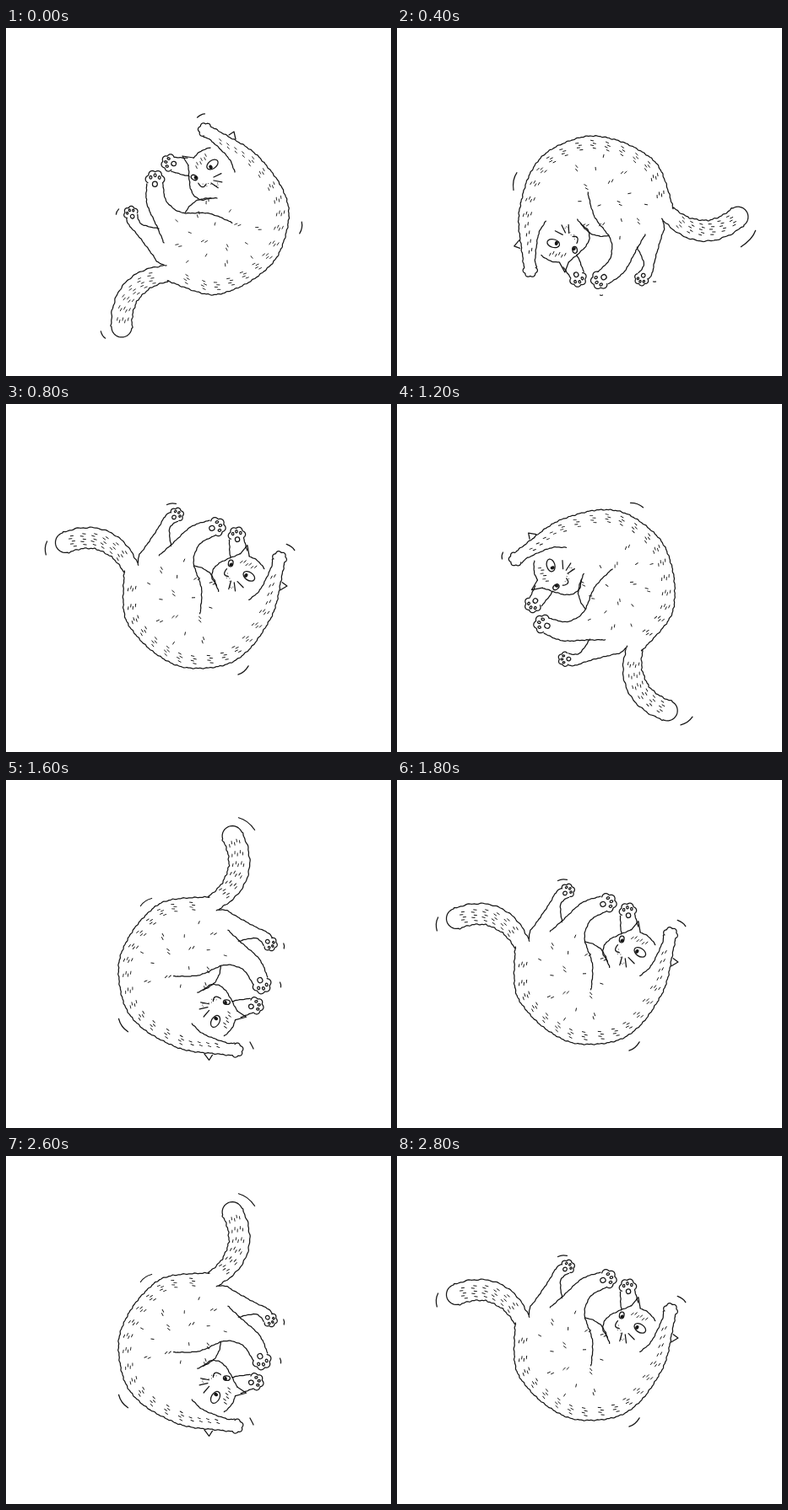
Recreate the animation shown at these times as an HTML page with a canvas. Size 456 by 413 pixels, loop 3000 ms.

```html
<!DOCTYPE html>
<html lang="en">
<head>
<meta charset="utf-8">
<title>Tumbling cat</title>
<style>
html, body { margin: 0; width: 100%; height: 100%; overflow: hidden; background: #fff; }
canvas { display: block; }
</style>
</head>
<body>
<canvas id="stage" width="456" height="413"></canvas>
<script>
const ctx = document.getElementById("stage").getContext("2d");
const POSE_MS = 200;
const INK = "#161616";
const PIVOT = [199.6, 217];

// The same cat turned about its pivot; swoosh: [x, y, angle, length]
const poses = [
  { x: 199.6, y: 217, turn: 0, swooshes:
    [[231, 104, -0.45, 10], [349, 237, 1.75, 14], [132, 218, -1.1, 7], [115, 364, 1, 10]] },
  { x: 216.1, y: 253.8, turn: -67.8, swooshes:
    [[284, 120, 0.35, 16], [125, 180, 1.7, 8], [343, 376, -0.6, 17]] },
  { x: 256.2, y: 258, turn: -127.3, swooshes:
    [[140, 182, 1.76, 21], [416, 250, 2.3, 26], [242, 317, 0, 3], [305, 301, 0, 3]] },
  { x: 266.8, y: 218, turn: -203.9, swooshes:
    [[285, 52, 0.65, 24], [166, 145, -0.6, 16], [139, 291, 0.95, 19],
     [329, 197, 1.5, 6], [325, 243, 1.4, 6], [291, 315, 1.1, 9]] },
  { x: 221.3, y: 179.5, turn: -288.7, swooshes:
    [[196, 119, -0.1, 11], [48, 171, 1.65, 16], [281, 316, -0.7, 16], [337, 170, 0.65, 12]] },
];

const mix = (a, b, t) => a + (b - a) * t;

function stroke(points) {
  ctx.beginPath();
  points.forEach(([x, y]) => ctx.lineTo(x, y));
  ctx.stroke();
}

// Catmull-Rom spline through key points, sampled about every pixel as [x, y, angle]
function spline(text) {
  const keys = text.split(" ").map(pair => pair.split(",").map(Number));
  const samples = [];
  for (let i = 0; i < keys.length - 1; i++) {
    const b = keys[i], c = keys[i + 1], a = keys[i - 1] || b, d = keys[i + 2] || c;
    const steps = Math.ceil(Math.hypot(c[0] - b[0], c[1] - b[1]));
    for (let s = 0; s <= steps; s++) {
      const t = s / steps;
      const at = k => b[k] + 0.5 * t * (c[k] - a[k]
        + t * (2 * a[k] - 5 * b[k] + 4 * c[k] - d[k] + t * (3 * (b[k] - c[k]) + d[k] - a[k])));
      if (s || !i) samples.push([at(0), at(1)]);
    }
  }
  return samples.map(([x, y], i) => {
    const p = samples[Math.max(i - 1, 0)], q = samples[Math.min(i + 1, samples.length - 1)];
    return [x, y, Math.atan2(q[1] - p[1], q[0] - p[0])];
  });
}

// Point to the right of a sample when looking along the curve
const beside = ([x, y, angle], distance) =>
  [x - Math.sin(angle) * distance, y + Math.cos(angle) * distance];

const fur = i => 0.35 * Math.sin(i * 0.53) + 0.25 * Math.sin(i * 1.1 + 1);

const curve = text => stroke(spline(text).map((p, i) => beside(p, fur(i) * 0.7)));

function oval(x, y, rx, ry, angle = 0, filled = false) {
  ctx.beginPath();
  ctx.ellipse(x, y, rx, ry, angle, 0, 2 * Math.PI);
  filled ? ctx.fill() : ctx.stroke();
}

// Short parallel hairs stacked across the coat's direction
function hairs(x, y, angle, count = 2, gap = 2.8) {
  ctx.lineWidth = 0.9;
  for (let i = 0; i < count; i++) {
    const shift = i % 2 ? 1.4 : -1.4;
    const [hx, hy] = beside([x, y, angle], (i - (count - 1) / 2) * gap);
    const c = Math.cos(angle + 0.2), s = Math.sin(angle + 0.2);
    stroke([[hx + (shift - 1.7) * c, hy + (shift - 1.7) * s],
            [hx + (shift + 1.7) * c, hy + (shift + 1.7) * s]]);
  }
  ctx.lineWidth = 1.25;
}

// Scalloped toes around a centre, with pads when the sole shows
function paw(x, y, angle, r, sole = true) {
  const rim = [];
  for (let s = 0; s <= 1; s += 0.02) {
    const a = angle + (s - 0.5) * 4, radius = r * (0.88 + 0.2 * Math.abs(Math.sin(4 * Math.PI * s)));
    rim.push([x + radius * Math.cos(a), y + radius * Math.sin(a)]);
  }
  stroke(rim);
  if (!sole) return;
  const c = Math.cos(angle), s = Math.sin(angle);
  oval(x - c * r * 0.5, y - s * r * 0.5, r * 0.3, r * 0.28, angle);
  for (const spread of [-0.95, 0, 0.95])
    oval(x + r * (0.6 * Math.cos(angle + spread) - 0.1 * c),
         y + r * (0.6 * Math.sin(angle + spread) - 0.1 * s), r * 0.17, r * 0.13, angle);
}

function drawBack() {
  const back = spline("243,117 262,128 286,142 304,158 327,190 335,224 323,268 299,294 268,311 238,316 191,300");
  stroke(back.map((p, i) => beside(p, fur(i))));
  for (let i = 66; i < back.length - 12; i += 20) {
    const p = back[i];
    hairs(...beside(p, 10), p[2], 4);
  }
}

function drawTail() {
  const spine = spline("190,291 165,299 146,316 138,337 137,355");
  const last = spine.length - 1;
  const side = sign => spine.map((p, i) =>
    beside(p, sign * (mix(9.5, 12.3, Math.min(1, i / 40)) + 1.3 * fur(i * 0.8 + sign))));
  const [tipX, tipY, tipAngle] = spine[last];
  const cap = Array.from({ length: 20 }, (_, i) => {
    const a = tipAngle + Math.PI * (0.5 - (i + 0.5) / 20);
    return [tipX + 12 * Math.cos(a), tipY + 12 * Math.sin(a)];
  });
  stroke([...side(1), ...cap, ...side(-1).reverse()]);
  for (let i = 20; i < last; i += 13) hairs(...beside(spine[i], -1), spine[i][2], 5, 3.2);
}

function drawLimbs() {
  paw(236, 121, -2.5, 8, false);
  curve("234,129 242,133 258,148 266,158 271,171");

  paw(194, 160, 3.35, 9.5);
  curve("199,153 206,154 215,154");
  curve("196,170 205,173 217,176");

  paw(176.5, 180, -1.55, 10.5);
  curve("167,185 166,198 168,212 179,236 187,255");
  curve("186,184 187,195 191,207 208,219 240,220 268,231");

  paw(148, 220, -2, 8);
  curve("143,226 145,233 157,247 172,267 180,278 190,282");
  curve("156,221 157,228 163,234 181,238");
}

function drawHead() {
  stroke([[264, 127], [270, 123], [272, 132]]);
  stroke([[222, 154], [209, 152], [216, 163]]);
  curve("222,154 231,146 242,142");
  curve("216,163 217,180 219,192 224,200 232,204 243,202");
  curve("212,219 219,210 228,204 240,202 250,202");

  oval(244.5, 162, 7.5, 4.8, -0.65);
  oval(242.5, 165, 2, 2.6, -0.65, true);
  oval(223, 177.5, 4, 2.8, 0.5);
  oval(224.5, 177.5, 1.8, 2.2, 0, true);
  curve("228,184 230,187 234,189 237,185");
  for (const [x, y, slope] of [[246, 177, -0.45], [246, 181, 0.2], [243, 184, 0.6]])
    stroke([[x, y], [x + 10 * Math.cos(slope), y + 10 * Math.sin(slope)]]);

  for (let i = 0; i < 3; i++) hairs(226 + i * 5, 163 - i * 5, 0.9);
  for (let i = 0; i < 10; i++)
    oval(242 + 9 * Math.cos(i * 2.4), 186 + 6 * Math.sin(i * 3.1), 0.5, 0.5, 0, true);
}

// Loose hairs spiralling over the belly, plus a few down the arm
function drawCoat() {
  for (let i = 1; i <= 16; i++) {
    const r = 15 * Math.sqrt(i), a = i * 2.4;
    hairs(246 + r * Math.cos(a), 246 + 0.7 * r * Math.sin(a), a, 1 + i % 2);
  }
  for (let i = 0; i < 4; i++) hairs(254 + i * 9, 135 + i * 5, 0.6);
}

// Speed mark bowed away from the middle of the stage
function drawSwoosh([x, y, angle, length]) {
  const dx = Math.cos(angle) * length / 2, dy = Math.sin(angle) * length / 2;
  const outX = x - 232, outY = y - 220, bow = length * 0.2 / Math.hypot(outX, outY);
  ctx.beginPath();
  ctx.moveTo(x - dx, y - dy);
  ctx.quadraticCurveTo(x + outX * bow, y + outY * bow, x + dx, y + dy);
  ctx.stroke();
}

function draw() {
  const pose = poses[Math.floor(performance.now() / POSE_MS) % poses.length];
  ctx.fillStyle = "#fff";
  ctx.fillRect(0, 0, 456, 413);
  ctx.fillStyle = ctx.strokeStyle = INK;
  ctx.lineWidth = 1.25;
  ctx.lineCap = ctx.lineJoin = "round";
  pose.swooshes.forEach(drawSwoosh);

  ctx.save();
  ctx.translate(pose.x, pose.y);
  ctx.rotate(pose.turn * Math.PI / 180);
  ctx.translate(-PIVOT[0], -PIVOT[1]);
  drawBack();
  drawTail();
  drawLimbs();
  drawHead();
  drawCoat();
  ctx.restore();
  requestAnimationFrame(draw);
}
draw();
</script>
</body>
</html>
```
